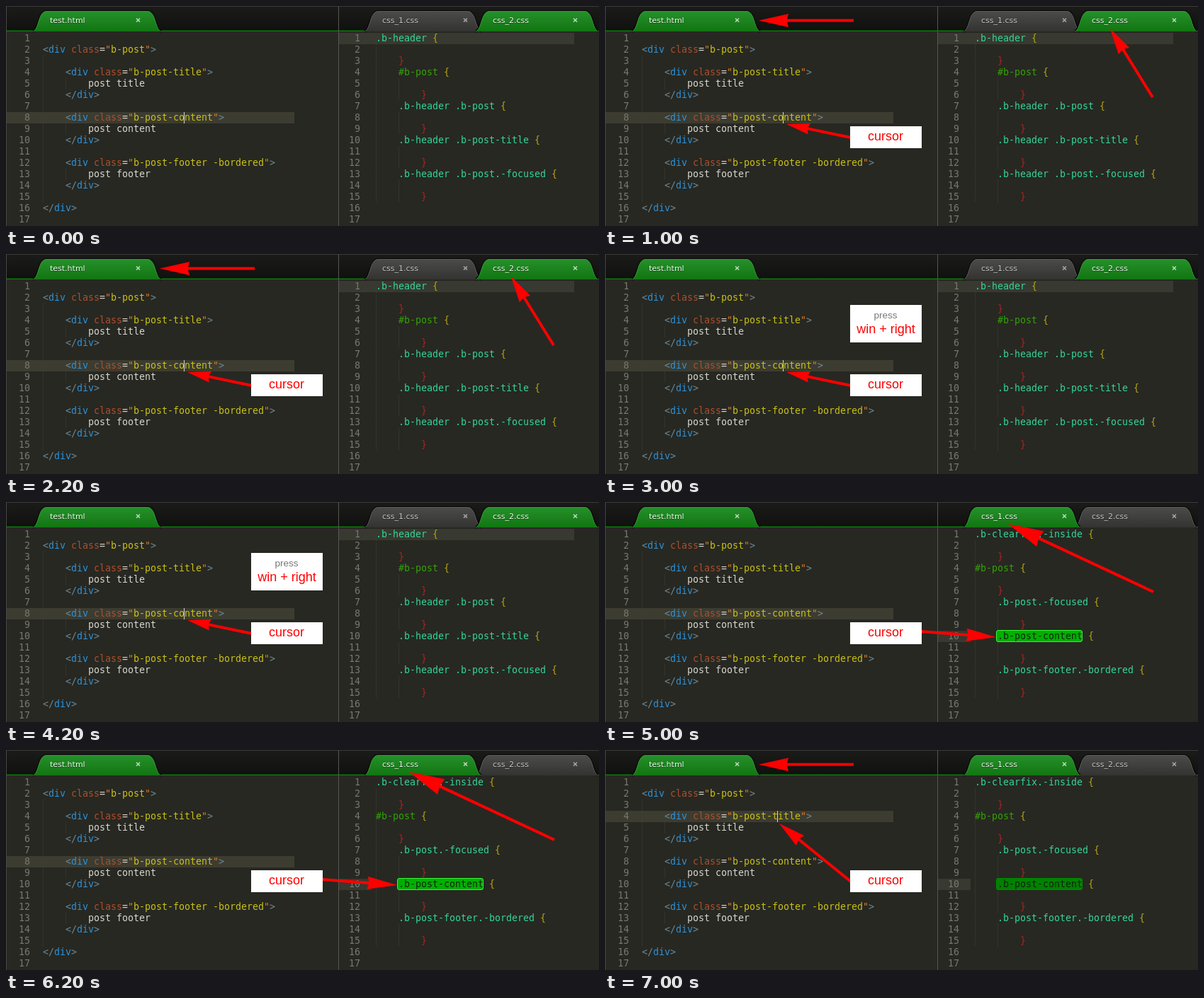
An HTML page that plays this animation: 837x311 px, repeating every 8 s.

```html
<!DOCTYPE html>
<html lang="en">
<head>
<meta charset="utf-8">
<title>Editor walkthrough</title>
<style>
  html, body { margin: 0; width: 100%; height: 100%; overflow: hidden; background: #272822; }
  svg { display: block; width: 837px; height: 311px; }
  text { white-space: pre; }
  .code { font: 13.29px "DejaVu Sans Mono", monospace; fill: #d6d6ce; }
  .number { fill: #77786f; text-anchor: end; }
  .bracket { fill: #6d8794; }
  .tag { fill: #2c92dc; }
  .attr { fill: #ad4f2c; }
  .equals { fill: #d6d6ce; }
  .quote { fill: #e07a28; }
  .string { fill: #c9c116; }
  .class { fill: #35d49a; }
  .id { fill: #35a008; }
  .open { fill: #b5a414; }
  .close { fill: #a42626; }
  .selected { fill: #10240e; }
  .guide { stroke: #3e3f37; stroke-dasharray: 1 1; }
  .tab { font: 11px "DejaVu Sans", sans-serif; fill: #f2f6f0; }
  .idle .tab { fill: #c6c6c3; }
  .tab.shadow { fill: #000; opacity: .55; }
  .cross { stroke: #c3d8c0; stroke-width: 1.5; }
  .idle .cross { stroke: #a9a9a6; }
  .note { font: 18px "Liberation Sans", Arial, sans-serif; fill: #f00; text-anchor: middle; }
  .note.small { font-size: 13.5px; fill: #777; }
  .arrow { fill: #f00; }
</style>
</head>
<body>
<svg id="stage" viewBox="0 0 837 311" xmlns="http://www.w3.org/2000/svg">
  <defs>
    <linearGradient id="bar" x2="0" y2="1"><stop stop-color="#1b1b19"/><stop offset="1" stop-color="#10100f"/></linearGradient>
    <linearGradient id="active" x2="0" y2="1"><stop stop-color="#25902a"/><stop offset="1" stop-color="#127512"/></linearGradient>
    <linearGradient id="idle" x2="0" y2="1"><stop stop-color="#4b4b49"/><stop offset="1" stop-color="#333331"/></linearGradient>
  </defs>
</svg>
<script>
const stage = document.getElementById('stage');
const LOOP = 8000;
const BEATS = [0, 1000, 3000, 5000, 7000];
const CHAR = 8, ROW = 16, LEFT = 52, RIGHT = 522;
const rowTop = row => 38 + ROW * (row - 1);

const rect = (x, y, w, h, fill, extra = '') =>
  `<rect x="${x}" y="${y}" width="${w}" height="${h}" fill="${fill}" ${extra}/>`;

const label = (x, y, kind, content) =>
  `<text x="${x}" y="${y}" class="${kind}">${content}</text>`;

const escapeText = s => s.replace(/</g, '&lt;').replace(/>/g, '&gt;');

// One line of code: parts are [kind, text] pairs.
const line = (x, row, col, ...parts) =>
  label(x + col * CHAR, rowTop(row) + 12, 'code',
    parts.map(([kind, s]) => `<tspan class="${kind}">${escapeText(s)}</tspan>`).join(''));

const numbers = x => Array.from({ length: 17 }, (_, i) =>
  label(x, rowTop(i + 1) + 12, 'code number', i + 1)).join('');

const guide = (x, from, to) =>
  `<path class="guide" d="M${x + .5} ${rowTop(from)}V${rowTop(to + 1)}"/>`;

const openTag = (row, col, name) => line(LEFT, row, col,
  ['bracket', '<'], ['tag', 'div '], ['attr', 'class'], ['equals', '='],
  ['quote', '"'], ['string', name], ['quote', '"'], ['bracket', '>']);

const closeTag = (row, col) => line(LEFT, row, col,
  ['bracket', '</'], ['tag', 'div'], ['bracket', '>']);

const block = (row, name, content) =>
  openTag(row, 4, name) + line(LEFT, row + 1, 8, ['plain', content]) +
  closeTag(row + 2, 4) + guide(LEFT + 32, row + 1, row + 1);

const rule = (row, col, selector) =>
  line(RIGHT, row, col, [selector[0] === '#' ? 'id' : 'class', selector], ['open', ' {']) +
  line(RIGHT, row + 2, col + 4, ['close', '}']) +
  (col ? guide(RIGHT + col * CHAR, row + 1, row + 2) : '');

function tab(x1, x2, name, textX, crossX, state) {
  const shape = `M${x1} 36C${x1 + 9} 33 ${x1 + 7} 8 ${x1 + 19} 7.5H${x2 - 19}C${x2 - 7} 8 ${x2 - 9} 33 ${x2} 36`;
  const edge = state === 'active' ? '#46a548' : '#696966';
  return `<g class="${state}">
    <path d="${shape}" fill="none" stroke="#050505" stroke-width="3"/>
    <path d="${shape}Z" fill="url(#${state})"/>
    <path d="${shape}" fill="none" stroke="${edge}" stroke-width=".8"/>
    ${label(textX, 25, 'tab shadow', name)}${label(textX, 24, 'tab', name)}
    <path class="cross" d="M${crossX - 2.5} 17.5l5 5m0-5l-5 5"/></g>`;
}

function arrow(tailX, tailY, tipX, tipY, head, half) {
  const length = Math.hypot(tipX - tailX, tipY - tailY);
  const angle = Math.atan2(tipY - tailY, tipX - tailX) * 180 / Math.PI;
  const base = length - head, notch = base + 2;
  return `<path class="arrow" transform="translate(${tailX} ${tailY}) rotate(${angle})"
    d="M0-2H${notch}L${base}-${half}L${length} 0L${base} ${half}L${notch} 2H0Z"/>`;
}

const caret = (row, col) =>
  rect(LEFT + col * CHAR - 1, rowTop(row), 1, ROW, '#d8d8c8');

const currentLine = row => rect(1, rowTop(row), 406, ROW, '#3c3c31');

// Each digit of the pattern switches the group on or off for one beat.
const patterns = new Set();
function during(pattern, content) {
  patterns.add(pattern);
  return `<g style="animation: on${pattern} ${LOOP}ms step-end infinite">${content}</g>`;
}

const firstTab = state => tab(506, 671, 'css_1.css', 531, 648.5, state);
const secondTab = state => tab(663, 836, 'css_2.css', 687, 803.5, state);

const selection = (fill, edge) =>
  rect(552.5, rowTop(10) - .5, 121, 16, fill, `stroke="${edge}" rx="2.5"`) +
  line(RIGHT, 10, 4, ['selected', '.b-post-content']);

const chrome =
  rect(0, 0, 837, 311, '#272822') + rect(0, 0, 837, 36, 'url(#bar)') +
  rect(0, 34, 837, 1, '#0b4a0b') + rect(0, 35, 837, 1, '#147414') +
  tab(38, 219, 'test.html', 62, 186.5, 'active');

const markup =
  during('11110', currentLine(8)) + during('00001', currentLine(4)) +
  numbers(34) + guide(LEFT, 3, 15) +
  openTag(2, 0, 'b-post') +
  block(4, 'b-post-title', 'post title') +
  block(8, 'b-post-content', 'post content') +
  block(12, 'b-post-footer -bordered', 'post footer') +
  closeTag(16, 0) +
  during('11100', caret(8, 25)) + during('00001', caret(4, 24));

const secondSheet = firstTab('idle') + secondTab('active') +
  rect(470, rowTop(1), 332, ROW, '#383930') + guide(RIGHT, 2, 15) +
  rule(1, 0, '.b-header') + rule(4, 4, '#b-post') +
  rule(7, 4, '.b-header .b-post') + rule(10, 4, '.b-header .b-post-title') +
  rule(13, 4, '.b-header .b-post.-focused');

const firstSheet = secondTab('idle') + firstTab('active') +
  rect(470, rowTop(10), 46, ROW, '#383930') + guide(RIGHT, 2, 15) +
  rule(1, 0, '.b-clearfix.-inside') + rule(4, 0, '#b-post') +
  rule(7, 4, '.b-post.-focused') + rule(10, 4, '.b-post-content') +
  rule(13, 4, '.b-post-footer.-bordered');

const frame =
  rect(0, 0, 1, 311, '#474845') + rect(469, 0, 1, 311, '#565753') +
  rect(0, 0, 837, 1, '#3a3a38');

const notes =
  during('01001', arrow(351, 20.5, 217, 20.5, 42, 9.5)) +
  during('01000', arrow(773, 129, 713, 32, 37, 9)) +
  during('00010', arrow(774, 127, 569, 31, 50, 12)) +
  during('01100', arrow(347, 186, 256, 167, 33, 8)) +
  during('00010', arrow(446, 183, 552, 191, 42, 9)) +
  during('00001', arrow(347, 186, 246, 104, 38, 9)) +
  during('01111', rect(346, 170, 101, 31, '#fff') + label(396, 190, 'note', 'cursor')) +
  during('00100', rect(346, 72, 101, 53, '#fff') +
    label(396, 91, 'note small', 'press') + label(396.5, 112, 'note', 'win + right'));

stage.insertAdjacentHTML('beforeend', chrome + markup +
  during('11100', secondSheet) + during('00011', firstSheet) +
  during('00010', selection('#00b000', '#3cf03c')) +
  during('00001', selection('#008200', '#008a00')) +
  numbers(500) + frame + notes);

const keyframes = [...patterns].map(pattern => {
  const stops = BEATS.map((time, i) =>
    `${time / LOOP * 100}% { visibility: ${+pattern[i] ? 'visible' : 'hidden'} }`);
  return `@keyframes on${pattern} { ${stops.join(' ')} }`;
});
document.head.insertAdjacentHTML('beforeend', `<style>${keyframes.join('\n')}</style>`);
</script>
</body>
</html>
```
